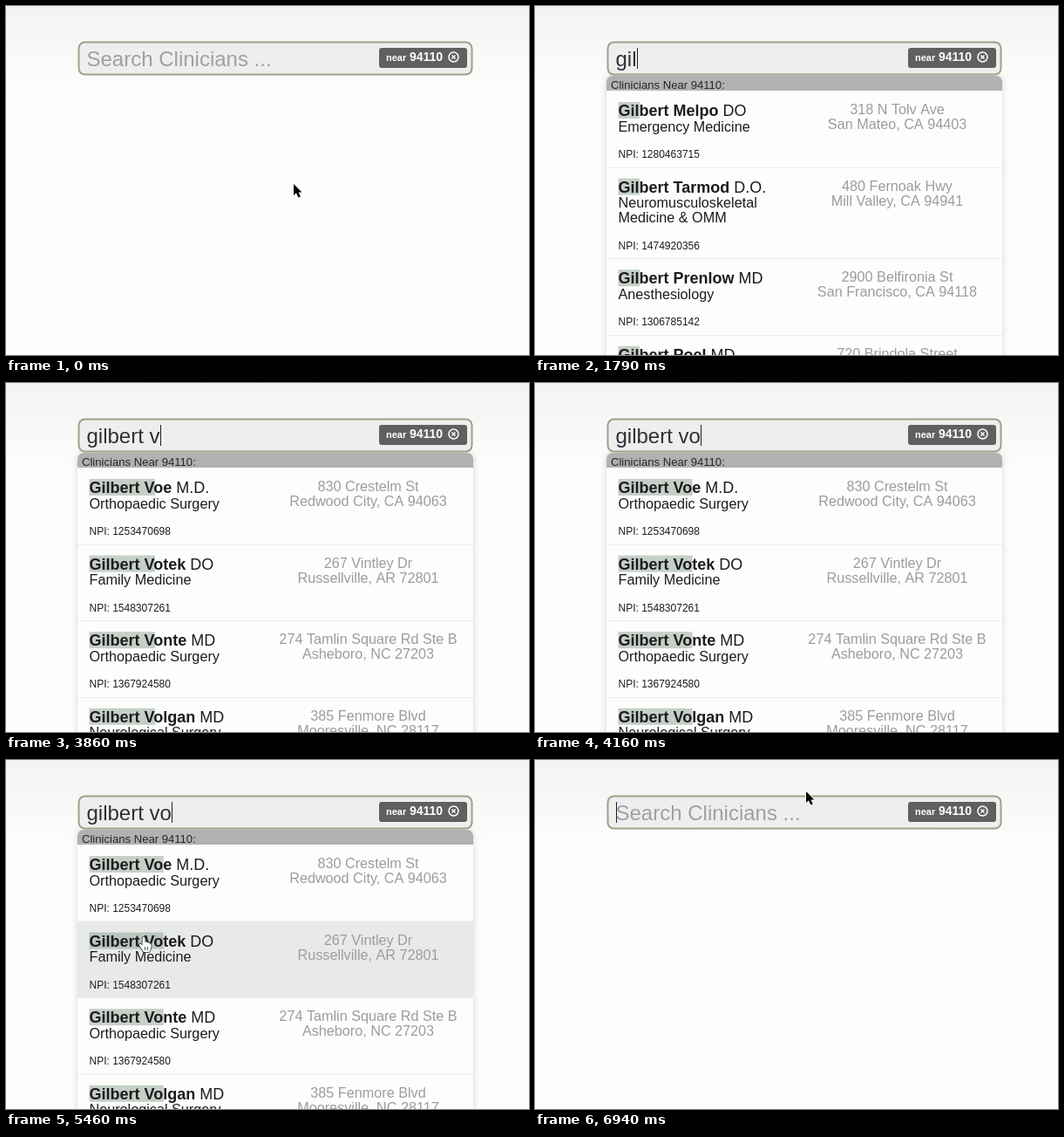
Animation, 600 px wide and 400 px high, one loop 7.04 s. Source, as an HTML page with a canvas:

```html
<!DOCTYPE html>
<html lang="en">
<head>
<meta charset="utf-8">
<title>Clinician search</title>
<style>
html, body { margin: 0; width: 600px; height: 400px; overflow: hidden; }
canvas { display: block; }
</style>
</head>
<body>
<canvas id="stage" width="600" height="400"></canvas>
<script>
const ctx = document.getElementById('stage').getContext('2d');
const LOOP = 7040, FOCUS = 1460, CLEAR = 6460;
const FAMILY = '"Liberation Sans", Arial, sans-serif';
const INK = '#1c1c1c', PAPER = '#fdfdfc';
const LEFT = 82, WIDTH = 454, TOP = 97;

// name, title, specialty lines, NPI, street, city
const broad = [
  ['Gilbert Melpo', 'DO', ['Emergency Medicine'], '1280463715', '318 N Tolv Ave', 'San Mateo, CA 94403'],
  ['Gilbert Tarmod', 'D.O.', ['Neuromusculoskeletal', 'Medicine & OMM'], '1474920356', '480 Fernoak Hwy', 'Mill Valley, CA 94941'],
  ['Gilbert Prenlow', 'MD', ['Anesthesiology'], '1306785142', '2900 Belfironia St', 'San Francisco, CA 94118'],
  ['Gilbert Poel', 'MD', [''], '', '720 Brindola Street', '']
];
const narrow = [
  ['Gilbert Voe', 'M.D.', ['Orthopaedic Surgery'], '1253470698', '830 Crestelm St', 'Redwood City, CA 94063'],
  ['Gilbert Votek', 'DO', ['Family Medicine'], '1548307261', '267 Vintley Dr', 'Russellville, AR 72801'],
  ['Gilbert Vonte', 'MD', ['Orthopaedic Surgery'], '1367924580', '274 Tamlin Square Rd Ste B', 'Asheboro, NC 27203'],
  ['Gilbert Volgan', 'MD', ['Neurological Surgery'], '', '385 Fenmore Blvd', 'Mooresville, NC 28117']
];

const query = 'gilbert vo';
const keyTimes = [1500, 1630, 1730, 1810, 2130, 2330, 2580, 3270, 3560, 3980];

// time, x, y of the pointer's hot spot
const path = [
  [100, 330, 204], [1300, 114, 58], [4620, 114, 58],
  [5360, 158, 203], [5800, 158, 203], [6940, 311, 36]
];

function text(str, x, y, size, color = INK, weight = '', align = 'left') {
  ctx.font = `${weight} ${size}px ${FAMILY}`;
  ctx.fillStyle = color;
  ctx.textAlign = align;
  ctx.fillText(str, x, y);
  return ctx.measureText(str).width;
}

function box(x, y, w, h, radius, fill) {
  ctx.beginPath();
  ctx.roundRect(x, y, w, h, radius);
  ctx.fillStyle = fill;
  ctx.fill();
}

function line(color, width, ...points) {
  ctx.beginPath();
  points.forEach(([x, y], i) => i ? ctx.lineTo(x, y) : ctx.moveTo(x, y));
  ctx.strokeStyle = color;
  ctx.lineWidth = width;
  ctx.stroke();
}

function pointerAt(t) {
  const next = path.findIndex(p => p[0] > t);
  if (next === 0) return path[0].slice(1);
  if (next < 0) return path[path.length - 1].slice(1);
  const a = path[next - 1], b = path[next];
  const u = (t - a[0]) / (b[0] - a[0]);
  const ease = u * u * (3 - 2 * u);
  return [1, 2].map(i => a[i] + (b[i] - a[i]) * ease);
}

function drawPage() {
  const sky = ctx.createLinearGradient(0, 0, 0, 100);
  sky.addColorStop(0, '#f3f3f3');
  sky.addColorStop(1, PAPER);
  ctx.fillStyle = sky;
  ctx.fillRect(0, 0, 600, 400);
}

function drawInput(typed, caret) {
  box(83.5, 41.5, 451, 37, 7, '#eeeeee');
  ctx.strokeStyle = '#a0a088';
  ctx.lineWidth = 2;
  ctx.stroke();
  const width = text(typed, 92.5, 69, 24, '#303030');
  if (!typed) text('Search Clinicians ...', 92.5, 69, 24, '#a0a0a0');
  if (caret) {
    ctx.fillStyle = '#202020';
    ctx.fillRect(Math.round(92.5 + width), 48, 1, 24);
  }

  box(428, 48, 101, 23, 3, '#606060');
  text('near', 436, 63, 11, '#fff', 'bold');
  text('94110', 463, 63, 14, '#fff', 'bold');
  ctx.beginPath();
  ctx.arc(513.5, 58.5, 5.5, 0, 7);
  ctx.strokeStyle = '#fff';
  ctx.lineWidth = 1.5;
  ctx.stroke();
  line('#fff', 1.5, [511.5, 56.5], [515.5, 60.5]);
  line('#fff', 1.5, [515.5, 56.5], [511.5, 60.5]);
}

function drawRow([name, title, fields, npi, street, city], y, height, matched, hover) {
  if (hover) {
    ctx.fillStyle = '#e8eae8';
    ctx.fillRect(LEFT, y, WIDTH, height);
  }
  ctx.font = `bold 18px ${FAMILY}`;
  ctx.fillStyle = hover ? '#b9c6be' : '#c5cfc8';
  ctx.fillRect(95.5, y + 13, ctx.measureText(name.slice(0, matched)).width + 0.5, 19);

  const width = text(name + ' ', 95.5, y + 29, 18, INK, 'bold');
  text(title, 95.5 + width, y + 29, 18);
  fields.forEach((field, i) => text(field, 95.5, y + 46.5 + i * 17, 16.2));
  text('NPI: ' + npi, 95.5, y + height - 10.5, 12);
  text(street, 415.5, y + 27, 16.2, '#9c9c9c', '', 'center');
  text(city, 415.5, y + 44, 16.2, '#9c9c9c', '', 'center');

  const edge = Math.round(y + height) + 0.5;
  line('#ebebeb', 1, [LEFT, edge], [LEFT + WIDTH, edge]);
}

function drawResults(typed, mouse) {
  ctx.save();
  ctx.shadowColor = 'rgba(0, 0, 0, 0.16)';
  ctx.shadowBlur = 7;
  box(LEFT, 80, WIDTH, 340, 7, PAPER);
  ctx.restore();
  box(LEFT, 80, WIDTH, 17, [7, 7, 0, 0], '#b1b1b1');
  text('Clinicians Near 94110:', 87, 95, 13.1, '#262626');
  let y = TOP;
  for (const person of typed.length > 8 ? narrow : broad) {
    const height = 70.6 + 17 * person[2].length;
    const hover = mouse && mouse[1] >= y && mouse[1] < y + height;
    drawRow(person, y, height, typed.trimEnd().length, hover);
    y += height;
  }
}

function drawShape(d, fill, stroke, width) {
  const shape = new Path2D(d);
  ctx.lineJoin = 'round';
  ctx.strokeStyle = stroke;
  ctx.lineWidth = width;
  ctx.stroke(shape);
  ctx.fillStyle = fill;
  ctx.fill(shape);
}

function drawPointer([x, y], open) {
  ctx.save();
  ctx.translate(x, y);
  if (y > 41 && y < 79 && x > 83 && x < 428) {
    line('#303030', 1.3, [-3, -7], [0, -5.5], [3, -7]);
    line('#303030', 1.3, [0, -5.5], [0, 5.5]);
    line('#303030', 1.3, [-3, 7], [0, 5.5], [3, 7]);
  } else if (open && y >= TOP) {
    drawShape('M-1.5 1Q0-1 1.5 1V6Q3 4.5 4 6.5Q6 5 6.5 7.5Q8.5 6.5 8.5 9V12L6.5 17H0L-4 11Q-6 8-4 7.5L-1.5 9.5Z',
      '#fff', '#303030', 1.6);
    line('#303030', 0.8, [1.5, 11], [1.5, 15]);
    line('#303030', 0.8, [4.5, 11], [4.5, 15]);
  } else {
    drawShape('M0 0V13L3 10.3L5.3 15.5L7.8 14.4L5.5 9.5H9.5Z', '#000', '#fff', 2);
  }
  ctx.restore();
}

function frame() {
  const t = performance.now() % LOOP;
  const cleared = t >= CLEAR;
  const keys = cleared ? [] : keyTimes.filter(k => k <= t);
  const typed = query.slice(0, keys.length);
  const blinkStart = cleared ? CLEAR : keys[keys.length - 1] || FOCUS;
  const caret = t >= FOCUS && (t - blinkStart) % 1000 < 500;
  const mouse = t < keyTimes[0] || t >= 4620 ? pointerAt(t) : null;

  drawPage();
  if (typed) drawResults(typed, mouse);
  drawInput(typed, caret);
  if (mouse) drawPointer(mouse, typed);
  requestAnimationFrame(frame);
}
frame();
</script>
</body>
</html>
```
